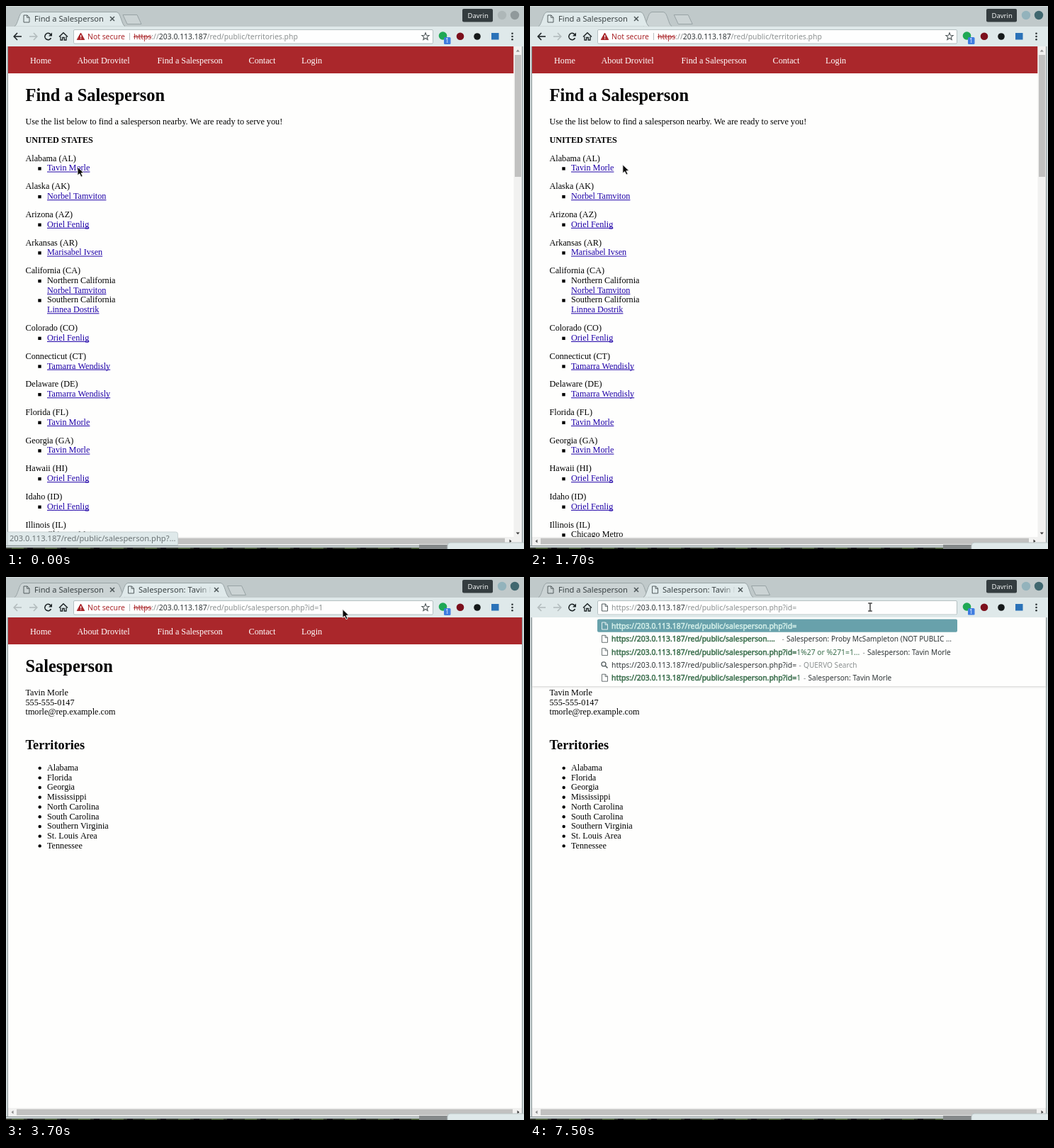
These frames come from a looping animation (731 by 766 pixels, 8 s). An HTML page with a canvas:

```html
<!DOCTYPE html>
<html lang="en">
<head>
<meta charset="utf-8">
<title>Find a Salesperson</title>
<style>
html, body { margin: 0; width: 100%; height: 100%; overflow: hidden; background: #fefefd; }
canvas { display: block; }
</style>
</head>
<body>
<canvas id="stage" width="731" height="766"></canvas>
<script>
const ctx = document.getElementById('stage').getContext('2d');
const LOOP = 8000, STEP = 100;
const SANS = '"Noto Sans", "Open Sans", sans-serif';
const SERIF = '"Liberation Serif", "Times New Roman", serif';
const BAR = '#dfe9ea', STRIP = '#c0c9ca', PAGE = '#fefefd', RED = '#aa272b';
const INK = '#2e3436', GREY = '#8b9090', TEAL = '#68a1ab', GREEN = '#3a6e4c', MAROON = '#7c0f1c';
const HOST = '203.0.113.187', DIR = '/red/public/', REP = 'Tavin Morle';
const QUERY = DIR + 'salesperson.php?id=';

const STATES = [
  ['Alabama (AL)', REP],
  ['Alaska (AK)', 'Norbel Tamviton'],
  ['Arizona (AZ)', 'Oriel Fenlig'],
  ['Arkansas (AR)', 'Marisabel Ivsen'],
  ['California (CA)', 'Norbel Tamviton', 'Linnea Dostrik'],
  ['Colorado (CO)', 'Oriel Fenlig'],
  ['Connecticut (CT)', 'Tamarra Wendisly'],
  ['Delaware (DE)', 'Tamarra Wendisly'],
  ['Florida (FL)', REP],
  ['Georgia (GA)', REP],
  ['Hawaii (HI)', 'Oriel Fenlig'],
  ['Idaho (ID)', 'Oriel Fenlig'],
  ['Illinois (IL)']
];
const REGIONS = ['Northern California', 'Southern California'];
const TERRITORIES = ['Alabama', 'Florida', 'Georgia', 'Mississippi', 'North Carolina',
  'South Carolina', 'Southern Virginia', 'St. Louis Area', 'Tennessee'];

const lerp = (a, b, k) => a + (b - a) * k;
const clamp = k => Math.max(0, Math.min(1, k));
const ease = k => k * k * (3 - 2 * k);

function rect(x, y, w, h, fill) {
  ctx.fillStyle = fill;
  ctx.fillRect(x, y, w, h);
}
function round(x, y, w, h, r, fill, stroke) {
  ctx.beginPath();
  ctx.roundRect(x, y, w, h, r);
  if (fill) { ctx.fillStyle = fill; ctx.fill(); }
  if (stroke) { ctx.strokeStyle = stroke; ctx.lineWidth = 1; ctx.stroke(); }
}
function disc(x, y, r, fill) {
  ctx.beginPath();
  ctx.arc(x, y, r, 0, 7);
  ctx.fillStyle = fill;
  ctx.fill();
}
function poly(points, fill, stroke, width = 1, open) {
  ctx.beginPath();
  points.forEach(([x, y]) => ctx.lineTo(x, y));
  if (!open) ctx.closePath();
  if (fill) { ctx.fillStyle = fill; ctx.fill(); }
  if (stroke) { ctx.strokeStyle = stroke; ctx.lineWidth = width; ctx.stroke(); }
}
const line = (x1, y1, x2, y2, color, width = 1) =>
  poly([[x1, y1], [x2, y2]], null, color, width, true);

// Draws text and returns the x where it ends.
function text(s, x, y, size, color, family = SANS, weight = '') {
  ctx.font = `${weight} ${size}px ${family}`;
  ctx.fillStyle = color;
  ctx.fillText(s, x, y);
  return x + ctx.measureText(s).width;
}
const ui = (s, x, y, color = INK, size = 11.15) => text(s, x, y, size, color);
const url = (s, x, y, color) => text(s, x, y, 10.4, color);
const serif = (s, x, y, color = '#000', size = 12.2, weight = '') => text(s, x, y, size, color, SERIF, weight);
function heavy(s, x, y, color) {
  const end = url(s, x, y, color);
  ctx.strokeStyle = color;
  ctx.lineWidth = 0.5;
  ctx.strokeText(s, x, y);
  return end;
}

function docIcon(x, y, color = '#555e60') {
  poly([[x, y], [x + 5, y], [x + 8, y + 3], [x + 8, y + 10], [x, y + 10]], null, color);
  poly([[x + 4.7, y], [x + 4.7, y + 3.3], [x + 8, y + 3.3]], null, color, 1, true);
}
function cross(x, y) {
  line(x - 3, y - 3, x + 3, y + 3, '#4b5456', 1.5);
  line(x - 3, y + 3, x + 3, y - 3, '#4b5456', 1.5);
}
function triangle(x, y, dx, dy, color) {
  poly([[x + dx * 2, y + dy * 2], [x - dx - dy * 2.6, y - dy - dx * 2.6], [x - dx + dy * 2.6, y - dy + dx * 2.6]], color);
}

function tabShape(x, w, active) {
  ctx.beginPath();
  ctx.moveTo(x, 28.5);
  ctx.bezierCurveTo(x + 5, 27, x + 6, 8.5, x + 12, 8.5);
  ctx.lineTo(x + w - 12, 8.5);
  ctx.bezierCurveTo(x + w - 6, 8.5, x + w - 5, 27, x + w, 28.5);
  ctx.fillStyle = active ? BAR : '#cbd3d4';
  ctx.fill();
  ctx.strokeStyle = '#98a3a5';
  ctx.lineWidth = 1;
  ctx.stroke();
}

function tabs(t) {
  const grow = ease(clamp((t - 1600) / 300));
  const second = t >= 2500;
  const w = 155 * grow;
  const drawSecond = () => {
    if (w < 30) return;
    tabShape(160, w, second);
    if (w < 60) return;
    if (second) docIcon(172.5, 13);
    else {
      const a = t / 160;
      ctx.beginPath();
      ctx.arc(176, 18.3, 4.6, a, a + 4.6);
      ctx.strokeStyle = '#4a5355';
      ctx.lineWidth = 1.8;
      ctx.stroke();
    }
    const end = 160 + w - 25;
    const fade = ctx.createLinearGradient(end - 18, 0, end, 0);
    fade.addColorStop(0, '#3b4345');
    fade.addColorStop(1, 'rgba(59,67,69,0)');
    ui('Salesperson: ' + REP, 187, 22, fade);
    cross(160 + w - 18, 18);
  };
  const drawFirst = () => {
    tabShape(12, 156, !second);
    docIcon(25, 13);
    ui('Find a Salesperson', 40, 22, '#3b4345');
    cross(150, 18);
  };

  rect(0, 0, 731, 29, STRIP);
  rect(0, 0, 731, 1, '#d5dcdc');
  const nx = 165 + 147.5 * grow;
  poly([[nx, 12.5], [nx + 20, 12.5], [nx + 26, 25.5], [nx + 6, 25.5]], '#cbd3d4', '#98a3a5');
  if (second) { drawFirst(); drawSecond(); } else { drawSecond(); drawFirst(); }

  const focused = t >= 900;
  round(644, 4, 43, 18.5, 2, '#343c3f');
  ui('Davrin', 651.5, 17, '#f2f4f4', 9.5);
  disc(700, 13, 6.2, focused ? '#93b3bc' : '#aeb7b8');
  disc(718, 13, 6.2, focused ? '#40676f' : '#90999b');
}

function arrowIcon(x, dir, color) {
  line(x - 5.5, 43, x + 5.5, 43, color, 1.6);
  poly([[x + dir * 0.5, 38], [x + dir * 5.3, 43], [x + dir * 0.5, 48]], null, color, 1.6, true);
}

function starIcon(cx, cy) {
  const star = [];
  for (let i = 0; i < 10; i++) {
    const r = i % 2 ? 2.3 : 5.4, a = i * Math.PI / 5 - Math.PI / 2;
    star.push([cx + r * Math.cos(a), cy + r * Math.sin(a)]);
  }
  poly(star, null, '#50585a', 1.1);
}

function address(t, second) {
  const selected = t >= 4300 && t < 4800;
  const tone = c => selected ? '#fff' : c;
  if (selected) rect(180, 36, 267, 14, TEAL);
  poly([[105.5, 38], [110.7, 47.5], [100.3, 47.5]], RED, RED);
  rect(105, 41, 1.2, 3.4, '#fff');
  rect(105, 45.4, 1.2, 1.2, '#fff');
  url('Not secure', 115, 47, RED);
  rect(174, 38, 1, 10, '#b9bebf');
  let x = url('https', 180, 47, tone(RED));
  line(180, 43.5, x, 43.5, tone(RED));
  x = url('://', x, 47, tone(GREY));
  x = url(HOST, x, 47, tone(INK));
  url(second ? QUERY + '1' : DIR + 'territories.php', x, 47, tone(GREY));
  const caret = (t >= 4100 && t < 4300) || (t >= 4800 && t < 5300) ||
    (t >= 5800 && t < 6200) || t >= 6700;
  if (caret) rect(446.5, 36, 1, 14, '#111');
  starIcon(592, 43.2);
}

function typedAddress(t) {
  docIcon(101.5, 38);
  let x = url('https://', 115, 47, GREY);
  x = url(HOST, x, 47, INK);
  url(QUERY, x, 47, GREY);
  if (t < 7500) rect(377, 36, 1, 14, '#111');
}

function toolbar(t) {
  const second = t >= 2500;
  const dark = '#1d2426', pale = '#b3bcbd';
  rect(0, 29, 731, 28, BAR);
  arrowIcon(16.5, -1, second ? pale : dark);
  arrowIcon(38.5, 1, pale);
  ctx.beginPath();
  ctx.arc(59.5, 43, 4.6, 0.5, 5.5);
  ctx.strokeStyle = dark;
  ctx.lineWidth = 1.6;
  ctx.stroke();
  poly([[65, 37.5], [65, 42.5], [60, 42.5]], dark);
  poly([[75, 43.5], [81, 37.8], [87, 43.5]], null, dark, 1.5, true);
  poly([[77, 43], [77, 48], [79.7, 48], [79.7, 44.5], [82.3, 44.5], [82.3, 48], [85, 48], [85, 43]], null, dark, 1.3, true);

  round(95.5, 33.5, 507, 19.5, 1.5, '#fefefe', '#b5c0c2');
  if (t >= 7100) typedAddress(t); else address(t, second);

  disc(616.5, 42, 5.8, '#1fa855');
  round(618, 44, 9.5, 10, 1.5, '#3f7de0');
  ui('1', 620.3, 52, '#fff', 8);
  disc(641, 42.8, 5.3, MAROON);
  disc(665, 43, 4.8, '#15191a');
  rect(685, 38, 10.5, 9.5, '#2a72b8');
  for (let i = -1; i < 2; i++) disc(714.5, 43 + i * 4.3, 1.3, '#2b3335');
}

function nav(width) {
  rect(3, 57, width, 38, RED);
  [['Home', 34], ['About Drovitel', 100.5], ['Find a Salesperson', 213.5], ['Contact', 342.5], ['Login', 417]]
    .forEach(([s, x]) => serif(s, x, 80.7, '#fff'));
}

function link(s, x, y) {
  const end = serif(s, x, y, '#1e00a8');
  rect(x, y + 1.1, end - x, 1, '#1e00a8');
}

const ROW = 13.725;
function listPage() {
  nav(713.5);
  serif('Find a Salesperson', 27.5, 133.8, '#000', 24.4, 'bold');
  serif('Use the list below to find a salesperson nearby. We are ready to serve you!', 27.5, 167);
  serif('UNITED STATES', 27.5, 192.8, '#000', 12.2, 'bold');
  let y = 218.7;
  const bullet = () => rect(45.3, y - 5.2, 4.4, 4.4, '#000');
  STATES.forEach(([state, ...reps]) => {
    serif(state, 27.5, y);
    reps.forEach((rep, i) => {
      y += ROW;
      bullet();
      if (reps.length > 1) {
        serif(REGIONS[i], 58, y);
        y += ROW;
      }
      link(rep, 58, y);
    });
    if (!reps.length) {
      y += ROW;
      bullet();
      serif('Chicago Metro', 58, y);
    }
    y += ROW + 12.2;
  });
  rect(716.5, 57, 11.5, 692, '#f1f1f0');
  rect(718, 69, 9, 172, '#c1c1c0');
  triangle(722.3, 63.5, 0, -1, '#8a8a8a');
  triangle(722.3, 743.5, 0, 1, '#3c3c3c');
}

function repPage() {
  nav(725);
  serif('Salesperson', 27.5, 133.8, '#000', 24.4, 'bold');
  [REP, '555-555-0147', 'tmorle@rep.example.com'].forEach((s, i) => serif(s, 27.5, 167 + i * ROW));
  serif('Territories', 27.5, 242.5, '#000', 18.3, 'bold');
  TERRITORIES.forEach((s, i) => {
    const y = 273 + i * ROW;
    disc(47.7, y - 3.4, 2.2, '#000');
    serif(s, 58, y);
  });
}

function frame(second) {
  const right = second ? 728 : 717;
  rect(3, 749, 725, 12, '#f1f1f0');
  rect(15, 750.7, right - 28, 8.6, '#c1c1c0');
  triangle(9.5, 755, -1, 0, second ? '#8a8a8a' : '#555');
  triangle(right - 5.5, 755, 1, 0, '#3c3c3c');
  rect(0, 29, 2, 734, '#cfd8d9');
  rect(2, 57, 1, 704, '#8d989a');
  rect(728, 57, 1, 704, '#8d989a');
  rect(729, 29, 2, 734, '#cfd8d9');
  rect(0, 761, 731, 1, '#8d989a');
  rect(0, 762, 731, 2.5, '#c9d1d2');
  rect(0, 764, 583, 2, '#34392f');
  for (let x = 8; x < 575; x += 47) {
    rect(x, 764, 17, 2, '#4f6040');
    rect(x + 22, 764, 8, 2, '#1c1a1d');
  }
  rect(583, 760, 41, 6, '#85898a');
  round(623, 757, 112, 14, 4, BAR, '#b9c3c4');
}

function bubble(label, alpha) {
  if (alpha <= 0) return;
  ctx.globalAlpha = alpha;
  round(2.5, 742, 240, 18.5, [0, 3, 0, 0], BAR, '#c9d3d4');
  ui(label, 5, 755.3, '#6c7476');
  ctx.globalAlpha = 1;
}

function menu(t) {
  ctx.save();
  ctx.shadowColor = 'rgba(0,0,0,.35)';
  ctx.shadowBlur = 7;
  ctx.shadowOffsetY = 2;
  round(99.5, 230, 283.5, 168, 2, '#fafbfb');
  ctx.restore();
  const hot = t >= 1100;
  if (hot) {
    const g = ctx.createLinearGradient(0, 232, 0, 252);
    g.addColorStop(0, '#535b5f');
    g.addColorStop(1, '#30383b');
    rect(100, 232, 282, 19.5, g);
  }
  [['Open link in new tab', 246], ['Open link in new window', 266], ['Open link in incognito window', 286],
    ['Save link as...', 314], ['Copy link address', 334], ['Block element', 362], ['Inspect', 390]]
    .forEach(([s, y], i) => ui(s, 127.5, y, hot && !i ? '#f4f5f5' : INK));
  ui('Ctrl+Shift+I', 302, 390, GREY);
  [295, 343, 371].forEach(y => rect(100, y, 282, 1, '#dde0e0'));
  disc(113.5, 357.5, 5.3, MAROON);
}

function dropdown() {
  ctx.save();
  ctx.shadowColor = 'rgba(0,0,0,.18)';
  ctx.shadowBlur = 3;
  ctx.shadowOffsetY = 1;
  rect(3, 57, 725, 97, PAGE);
  ctx.restore();
  rect(0, 53.5, 731, 3.5, BAR);
  round(95, 59.5, 508, 18.3, 2, TEAL);
  const base = 'https://' + HOST, full = base + QUERY;
  const y = i => 73 + i * 18.3;
  const note = (s, x, row, color = INK) => {
    text('-', x, y(row), 10.1, GREY);
    text(s, x + 6.5, y(row), 10.1, color);
  };
  [0, 1, 2, 4].forEach(i => docIcon(101.5, y(i) - 9, i ? '#6a7274' : '#e4eff0'));
  ctx.beginPath();
  ctx.arc(104, y(3) - 5, 3, 0, 7);
  ctx.strokeStyle = '#555e60';
  ctx.lineWidth = 1.3;
  ctx.stroke();
  line(106.3, y(3) - 2.7, 109.5, y(3) + 0.5, '#555e60', 1.5);

  heavy(full, 115, y(0), '#d5f0ea');
  heavy(base + DIR + 'salesperson....', 115, y(1), GREEN);
  note('Salesperson: Proby McSampleton (NOT PUBLIC …', 355.5, 1);
  url('1%27 or %271=1...', heavy(full, 115, y(2), GREEN), y(2), GREEN);
  note('Salesperson: ' + REP, 469.5, 2);
  url(full, 115, y(3), INK);
  note('QUERVO Search', 379.5, 3, GREY);
  url('1', heavy(full, 115, y(4), GREEN), y(4), GREEN);
  note('Salesperson: ' + REP, 386, 4);
}

function arrow(x, y) {
  poly([[0, 0], [0, 12], [2.8, 9.6], [5, 14.2], [7.2, 13.1], [5, 8.8], [8.8, 8.5]]
    .map(([a, b]) => [x + a, y + b]), '#0c0c0c', '#f4f4f4', 0.9);
}
function hand(x, y) {
  poly([[4, 0], [6, 0], [6.3, 5], [12, 6.5], [13, 8], [12, 14.5], [4.5, 14.5], [0, 8.5], [1.2, 7.2], [4, 9.2]]
    .map(([a, b]) => [x + a, y + b]), '#0c0c0c', '#f4f4f4', 0.9);
}
function beam(x, y) {
  line(x, y - 5, x, y + 5, '#111', 1.2);
  [-5.5, 5.5].forEach(d => line(x - 2.8, y + d, x + 2.8, y + d, '#111', 1.2));
}

function glide(t, start, end, from, to) {
  const k = ease(clamp((t - start) / (end - start)));
  arrow(lerp(from[0], to[0], k), lerp(from[1], to[1], k));
}
function pointer(t) {
  if (t < 100) arrow(101, 227);
  else if (t < 800) hand(t >= 500 && t < 600 ? 95.5 : 96.5, 226.5);
  else if (t < 1100) arrow(101, 229);
  else if (t < 1700) arrow(127, 233);
  else if (t < 3000) glide(t, 1600, 2400, [127, 233], [217.5, 20]);
  else if (t < 4000) glide(t, 3100, 3700, [279.5, 89], [475, 45.5]);
  else beam(480, 42.5);
}

function draw(t) {
  const second = t >= 2500;
  rect(0, 0, 731, 766, PAGE);
  if (second) repPage(); else listPage();
  frame(second);
  if (second) bubble('Waiting for ' + HOST + '...', t < 2800 ? 1 : (3000 - t) / 250);
  else bubble(HOST + DIR + 'salesperson.php?...', t < 1100 ? 1 : (1400 - t) / 340);
  tabs(t);
  toolbar(t);
  if (t >= 800 && t < 1700) menu(t);
  if (t >= 7100) dropdown();
  pointer(t);
}

const begin = performance.now();
function tick() {
  const t = (performance.now() - begin) % LOOP;
  draw(Math.floor(t / STEP) * STEP);
  requestAnimationFrame(tick);
}
tick();
</script>
</body>
</html>
```
